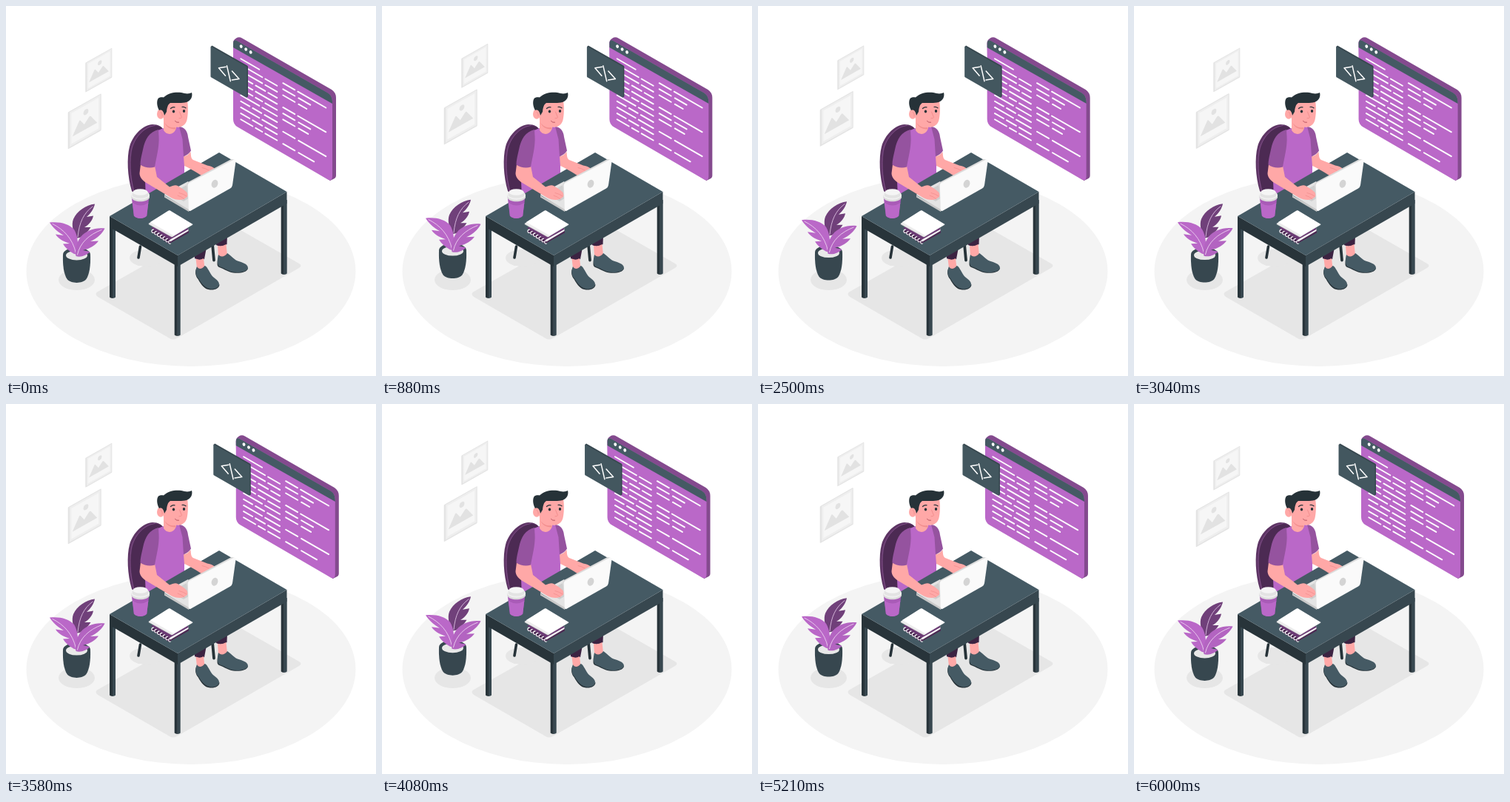
An HTML page with a canvas that plays this animation: 500 by 500 pixels, repeating every 6040 ms.

```html
<!DOCTYPE html>
<html lang="en">
<head>
<meta charset="utf-8">
<title>Programmer at a desk</title>
<style>
html, body { margin: 0; width: 100%; height: 100%; overflow: hidden; background: #fff; }
canvas { display: block; width: 500px; height: 500px; }
</style>
</head>
<body>
<canvas id="stage"></canvas>
<script>
const canvas = document.getElementById('stage');
const ctx = canvas.getContext('2d');
const dpr = window.devicePixelRatio || 1;
canvas.width = canvas.height = 500 * dpr;

const LOOP = 6040, SLOPE = 0.576;
const PURPLE = '#ba68c8', PLUM = '#844a8e', SLEEVE = '#95539f', DEEP = '#4c2a53';
const SLATE = '#455a64', STEEL = '#37474f', INK = '#263238', SHADE = '#28343a';
const SKIN = '#ffa8a7', BLUSH = '#f28f8f';

function fill(d, color) {
  ctx.fillStyle = color;
  ctx.fill(new Path2D(d));
}
function line(d, color, width = 1) {
  ctx.strokeStyle = color;
  ctx.lineWidth = width;
  ctx.stroke(new Path2D(d));
}
function oval(x, y, rx, ry, color, turn = 0) {
  ctx.fillStyle = color;
  ctx.beginPath();
  ctx.ellipse(x, y, rx, ry, turn, 0, Math.PI * 2);
  ctx.fill();
}
function shifted(dx, dy, draw) {
  ctx.save();
  ctx.translate(dx, dy);
  draw();
  ctx.restore();
}

function floor() {
  oval(250, 358.5, 222.5, 128.5, '#f4f4f4');
  fill('M124 386L290 292Q294 290 298 292L396 348Q401 351 396 354L231 449Q226 452 221 449L124 393Q119 389 124 386Z', '#e6e6e6');
  oval(190, 340.5, 23, 11.5, '#e6e6e6');
  oval(95.5, 370, 24.5, 14, '#e6e6e6');
}

function picture(x, y, s) {
  ctx.save();
  ctx.transform(s, -0.565 * s, 0, s, x, y);
  fill('M1 0H44Q45 0 45 1V49Q45 50 44 50H1Q0 50 0 49V1Q0 0 1 0Z', '#e3e3e3');
  fill('M2.2 1.2H44V48.4H2.2Z', '#eeeeee');
  fill('M4.5 4H41.5V45.5H4.5Z', '#f6f6f6');
  fill('M6 36.5L15 21Q16 19.5 17 21L22 29L28.5 22.5Q30 21.5 31 23L39.5 36.5Z', '#e2e2e2');
  oval(24.3, 13.5, 3.4, 3.7, '#e2e2e2');
  ctx.restore();
}

function plant() {
  fill('M77 336C76.500 350 78 362 82.500 369C88 375.500 103 375.500 108.500 369C113 362 114.500 350 114 336Z', STEEL);
  oval(95.5, 336, 18.5, 9.5, STEEL);
  oval(95.5, 337, 14.5, 6.4, '#e8e8e8');
  fill('M120 267.5C108 269 96 277 91 288C88 296 91 304 94 314L100 313C106 309 111 305 114.500 299L106 299C113 295 117 289 118 283.500L109 285C115 280 119 273 120 267.500Z', '#70407a');
  line('M117 271C105 280 99 292 97 312', '#dcc0e1', 0.9);
  fill('M59 292.500C72 291 85 294 92 302C97 310 98 322 97 336L92 335C85 331 80 327 77 321.500L86 321C77 318 70 314 67 308.500L78 310C69 305 63 299 59 292.500Z', PURPLE);
  line('M63 294.500C78 302 90 314 94.500 334', '#ecd2f0', 0.9);
  fill('M133.500 300.500C121 299 108 303 101 312C95 320 93 330 94.500 338C101 340 109 337 113.500 332L104 330C114 328 121 323 125 317.500L114 318C123 314 130 308 133.500 300.500Z', '#b364c1');
  line('M129 302.500C112 309 100 320 96.500 336', '#ecd2f0', 0.9);
}

// Code rows on a shared pitch: [x, length] pairs
const PITCH = 8.2;
const leftRows = [
  [0, 25], [0, 29, 33, 16], [0, 29, 33, 16], [0, 16, 20, 13, 37, 12], [0, 16, 20, 29], [0, 16, 20, 9, 33, 16],
  [0, 25, 29, 20], [0, 12, 16, 12, 32, 17], [0, 25, 29, 20], [0, 12, 16, 13, 33, 16], [0, 16, 20, 9, 33, 16]
];
const rightRows = [
  [57, 16, 77, 38], [57, 16, 78, 16], [57, 16, 78, 11], [], [57, 16, 77, 38], [57, 16, 78, 16],
  [57, 16, 78, 13], [], [57, 16, 78, 37], [], [57, 16, 78, 21]
];
function codeRow(row, r) {
  for (let i = 0; i < row.length; i += 2) {
    const x = row[i], w = row[i + 1];
    line(`M${317.3 + x} ${71.3 + PITCH * r + x * SLOPE}l${w} ${w * SLOPE}`, '#fff', 1.9);
  }
}

function windowPanel() {
  fill('M307 50C307 46 310 44 313 42.500Q316 41.500 319 43.500L440 113Q446 117 446 124V229Q446 232 443 233.500L438 236L309 155Z', PLUM);
  const face = 'M307 51Q307 44 313 47.500L435 117.500Q441 121.500 441 129V230Q441 237.500 435 234.500L313 163.500Q307 160 307 153Z';
  fill(face, PURPLE);
  ctx.save();
  ctx.clip(new Path2D(face));
  fill('M306 40L442 116V132.500L306 55.500Z', SLATE);
  ctx.restore();
  for (let i = 0; i < 3; i++) oval(317.7 + 6.5 * i, 54.6 + 3.9 * i, 1.9, 2.3, '#fff', -0.4);

  leftRows.forEach(codeRow);
  rightRows.forEach(codeRow);

  fill('M276.500 55L278.500 53.500L326 80.500Q327 81 327 82V122.500L325 123.500Z', STEEL);
  fill('M276.500 56Q276.500 54.500 278 55.200L324.500 81.700Q325.500 82.300 325.500 83.500V122.500Q325.500 124 324 123.200L277.500 96.500Q276.500 96 276.500 95Z', '#43575f');
  line('M297 82.300L287.500 83.800L296.500 94.300M298.500 80.800L303.300 101.700M305.500 88L315 98.600L305.300 100', '#fff', 1.5);
}

function seat() {
  line('M181.500 325L179 340', INK, 3.6);
  line('M279 322L281 343.500', INK, 3.8);
  fill('M170 250C164 231 163 205 167 190C172 173 186 160.500 198 160C206 160 211 163 213 168L214 255H186Q174 256 170 250Z', '#5d3464');
  fill('M174 252C168 230 167 208 171 192C176 175 188 164 201 162C208 162 212 165 214 169V256H184Z', DEEP);
  line('M173 251C167 230 166.500 207 170 192C175 175 188 163 201 161.500', '#8d5a96', 0.7);
}

function legs() {
  fill('M254 330L271 326L268 342Q261 345 255 341Z', '#3c2342');
  fill('M282 315L299 309L298.500 322Q291 327 284 323Z', '#3c2342');
  fill('M256.500 341.500Q262 344 267 341L268.500 354Q263 359 258 354Z', SKIN);
  fill('M286 324Q292 325.500 297.500 322L299 337Q292 342 287 338Z', SKIN);
  fill('M257.500 354C255 359 256 365 259.500 369C264 377 268 383 276 383.500C283 384 288.500 381 288.500 376C281 383 266 372 257.500 354Z', INK);
  fill('M258 352C255.500 358 256 364 260 368C264 375 269 381 276 382.300C283 383 288 380 288 375.500C287 370 281 368 278 364C274 358 272 352 268.500 351C265 356 260 356 258 352Z', SLATE);
  fill('M286 343C285 349 285.500 352 288 353C295 355.500 300 359.500 307 360.500C316 361.500 326 360 327 354.500Z', INK);
  fill('M287 336C285.500 342 285 348 288 351.700C295 354 300 358 307 359.500C315 361 326 359 327 354C327 348.500 319 346.500 313 344.500C307 342 303 336 299 334C296 339 290 340 287 336Z', SLATE);
}

function torso() {
  fill('M203 169L213 165C218 172 226 172 230 163L238 164C242 180 241 205 241 232L222 250L189 260L188 236L190 214C190 190 194 172 203 169Z', PURPLE);
  fill('M234 163C241 164 245 168 246 177L250 195.500C248 199 244 202 240 203.500L238.500 180Z', SLEEVE);
}

function head() {
  oval(209, 146, 5, 6.7, SKIN);
  fill('M213 148V168C217 175 227 175 230 165L229 158Z', SKIN);
  fill('M214 157C218 164 225 165 229 164L229.500 166.500C222 167 216 163 214 157Z', BLUSH);
  fill('M216 130L245 128C246.500 137 246 148 244.500 154C243 161 237 164 231 163.700C222 163 214 159 212.500 151Z', SKIN);
  fill('M207 141C204 136 203 128 206 124.500C208 123 211 123 213 123.500C220 116 234 115.500 241 118C246 119 249 118 251 117C252.500 122 250 128 244 130C237 132 228 130.500 222 131C218.500 133 217.500 138 217 143L214 148C213 142 210.500 139.500 207 141Z', INK);
  line('M209 143.500Q212 145 211 149', BLUSH, 0.9);
  oval(226.5, 142.5, 1.7, 2, INK);
  oval(240.5, 142, 1.7, 2, INK);
  line('M222.500 138.500Q225 136 228 136.800M238 136.500Q240.500 135.800 243 137.800', INK, 1.2);
  line('M234.500 143L237.500 150.500Q236.500 152.200 234 151.800', BLUSH, 1);
  line('M228.500 155.500Q230.500 158 233.500 157.300', '#b95562', 1);
}

function post(x, top, bottom) {
  fill(`M${x} ${top}h4.200V${bottom + 1.5}Q${x + 1} ${bottom + 1.2} ${x} ${bottom}Z`, SHADE);
  fill(`M${x + 4} ${top}h4V${bottom}Q${x + 7} ${bottom + 1.2} ${x + 4} ${bottom + 1.5}Z`, STEEL);
}

function desk() {
  post(140, 290, 393.5);
  post(371.7, 262, 361.5);
  post(227.7, 343, 444.5);
  fill('M140 284L232 337V352L140 299Z', SHADE);
  fill('M232 337L379.500 251V267L232 352Z', STEEL);
  fill('M140 284L288 198L379.500 251L232 337Z', SLATE);
}

function cup() {
  fill('M169.800 259L172.800 283.500C176 288 187 288 190.200 283.500L193.300 259Z', '#a95bb7');
  fill('M171 266L173 283.500C176 288 187 288 190.200 283.500L192.300 266Q182 273 171 266Z', PURPLE);
  fill('M169.300 255V259C172 266 191 266 194 259V255Z', '#dcdcdc');
  oval(181.6, 255.5, 12.3, 6.4, '#f0f0f0');
  fill('M171.500 251.500L170.700 256C174 261 189 261 192.500 256L191.600 251.500Z', '#e3e3e3');
  oval(181.5, 251.5, 10.2, 4.3, '#f5f5f5');
}

function papers() {
  fill('M196 305L220 321.500L247 306.500V303L222 289Z', DEEP);
  fill('M221 315L246.500 300.500V304L222 318.500Z', '#f4f4f4');
  fill('M196 300L221 316L247 301.500L222 287Z', '#6b3a74');
  fill('M192.500 295L196 292L228 309L224 312.500Z', '#d6d6d6');
  fill('M192.500 294L219.500 276.500L252.500 295.500L225 312Z', '#ededed');
  fill('M195 292L221 276L252.500 295L226 310Z', '#fff');
  for (let i = 0; i < 7; i++) {
    const x = 198.5 + i * 3.8, y = 302.5 + i * 2.45;
    line(`M${x + 1} ${y - 0.5}C${x - 3} ${y} ${x - 2} ${y + 5} ${x + 1} ${y + 3.8}`, '#fff', 1.1);
  }
}

function laptopAndArms() {
  fill('M240 203.500Q246 202 249.500 197C250 203 250 206 253 208L272 215.500C278 216.500 283 219 284.500 223L280 229L264 229C258 225 248 219 241 216Z', SKIN);
  line('M265 218.500Q270 219.500 274 222', BLUSH, 0.8);
  fill('M214 256V258.500L247 278V274Z', '#c9c9c9');
  fill('M214 255.500Q214 254 216 253L246 237L262 264L247 275Z', '#e4e4e4');
  fill('M222 254L244 242L250 258L240 264Z', '#cfcfcf');
  fill('M182 214L180.500 226C180.500 231 184 235 188 238L213 253C220 257 226 262 235 262C241 262 245.500 258 246 255.500C245 250 238 247 232 243C229 241 225 243 221 244.500L204 231L201 216Z', SKIN);
  line('M232 256Q238 258 241 261M234 252.500Q240 254 244 257', BLUSH, 0.8);
  fill('M206 167C194 170 188 179 185 194C183 203 181.500 209 181.500 214.500C187 218.500 195 219.500 201 217.500C203 205 207.500 190 206.500 176Z', SLEEVE);
  fill('M244 241Q244 239 246 238L304 207.300Q306 206.500 308 207.500L310.500 209L247.500 277.500Z', '#dcdcdc');
  fill('M245.800 242Q245.800 240 247.500 239L307.500 207.800Q310.800 206.500 310.500 210L306 242Q305.500 245 303 246.500L250 276.500Q247 278 246.800 275Z', '#fafafa');
  oval(282, 240.3, 4.2, 5.6, '#d4d4d4', 0.35);
}

const shake = [0, -1, 2, -4, 4, -4, 4, -4, 2, -1, 0];

function pose(ms) {
  const lift = -10 * (1 - Math.abs((ms % 3000) / 1500 - 1));
  const p = (ms % 6000) / 600, i = Math.floor(p);
  const sway = shake[i] + (shake[i + 1] - shake[i]) * (p - i);
  return { lift, sway };
}

function draw(ms) {
  const { lift, sway } = pose(ms);
  ctx.setTransform(dpr, 0, 0, dpr, 0, 0);
  ctx.fillStyle = '#fff';
  ctx.fillRect(0, 0, 500, 500);
  ctx.lineCap = ctx.lineJoin = 'round';
  floor();
  shifted(0, lift, () => {
    picture(107.3, 76.8, 0.8);
    picture(83.7, 143.5, 1);
    plant();
  });
  shifted(sway, 0, windowPanel);
  seat();
  legs();
  torso();
  head();
  desk();
  cup();
  papers();
  laptopAndArms();
}

// 24 steps per second, each starting on a whole hundredth
const stepStart = k => Math.round(k * 25 / 6) * 10;
const start = performance.now();
function tick() {
  const t = Math.max(0, performance.now() - start) % LOOP;
  let k = Math.floor(t * 0.024) + 1;
  while (k > 0 && stepStart(k) > t) k--;
  draw(Math.min(k, 144) * 1000 / 24);
  requestAnimationFrame(tick);
}
tick();
</script>
</body>
</html>
```
